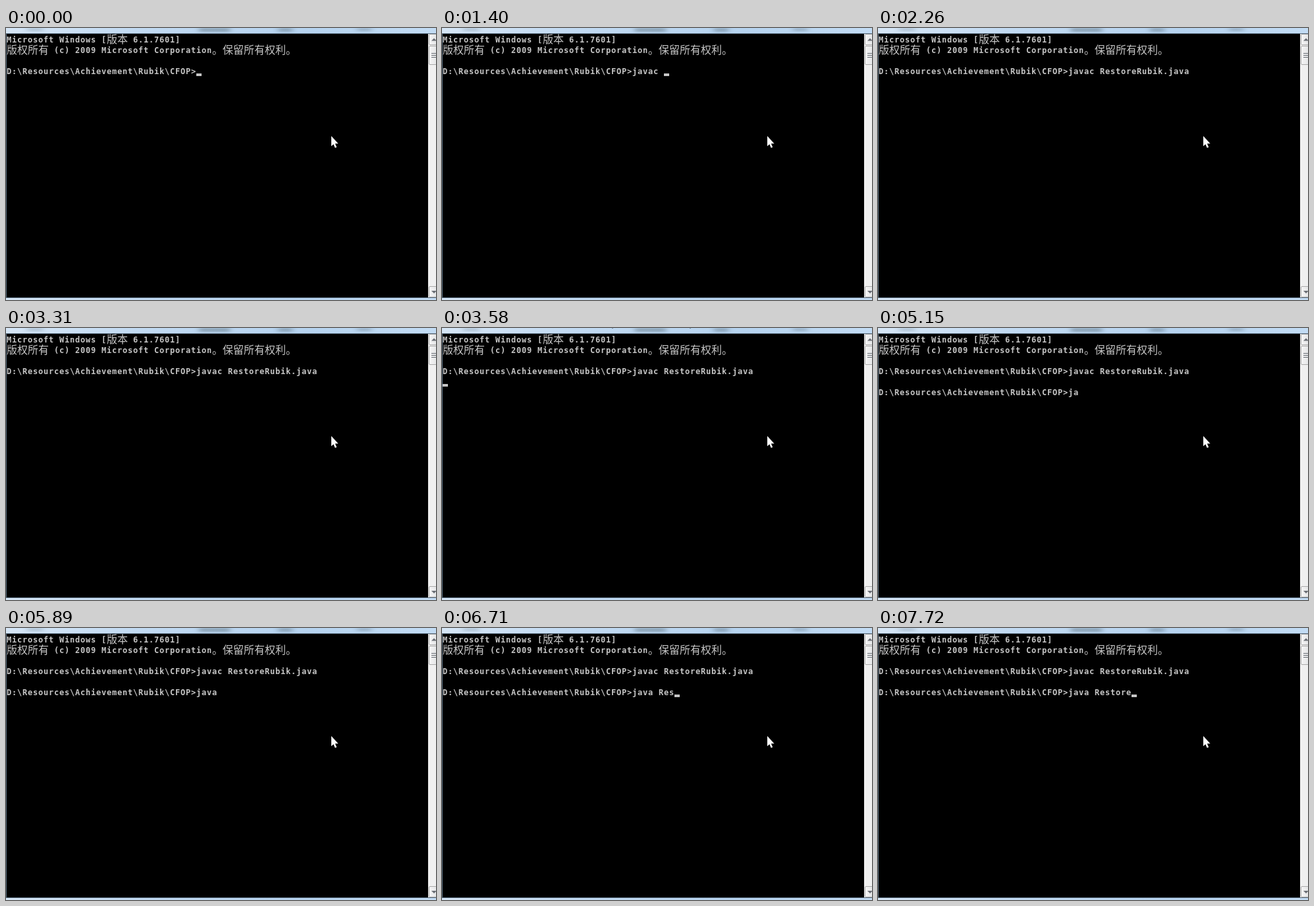
Write an HTML page that moves like this. It is 653 px wide and 413 px high and loops after 8000 ms.

```html
<!DOCTYPE html>
<html lang="zh">
<head>
<meta charset="utf-8">
<title>Console</title>
<style>
  html, body { margin: 0; width: 100%; height: 100%; overflow: hidden; background: #000; }
  svg { display: block; width: 653px; height: 413px; }
  text { white-space: pre; fill: #c6c6c6; }
  .latin { font: bold 12px "DejaVu Sans Mono", "Liberation Mono", monospace; letter-spacing: .776px; }
  .han { font: 300 16px "Noto Sans CJK SC", "Noto Sans CJK", sans-serif; }
</style>
</head>
<body>
<svg id="stage" viewBox="0 0 653 413">
  <defs>
    <linearGradient id="glass">
      <stop offset="0" stop-color="#d6e6f6"/>
      <stop offset=".3" stop-color="#c2daf2"/>
      <stop offset=".7" stop-color="#b6d3ef"/>
      <stop offset="1" stop-color="#c3dcf4"/>
    </linearGradient>
    <linearGradient id="button">
      <stop offset="0" stop-color="#f6f6f6"/>
      <stop offset="1" stop-color="#dfe0e2"/>
    </linearGradient>
    <filter id="soft" x="-50%" y="-200%" width="200%" height="500%">
      <feGaussianBlur stdDeviation="4 1.6"/>
    </filter>
  </defs>

  <rect width="653" height="413" fill="url(#glass)"/>
  <g fill="#6f8799" opacity=".6" filter="url(#soft)">
    <rect x="32" y="0" width="24" height="5" opacity=".5"/>
    <rect x="293" y="0" width="47" height="6"/>
    <rect x="413" y="0" width="22" height="6" opacity=".9"/>
    <rect x="533" y="0" width="22" height="5" opacity=".7"/>
  </g>
  <g id="busy" fill="#4f6272" opacity=".6">
    <rect x="258" y="0" width="2" height="1"/>
    <rect x="376" y="0" width="2" height="1"/>
  </g>
  <rect y="8" width="653" height="402" fill="#56697a"/>
  <rect x="1" y="9" width="640" height="400" fill="#000"/>

  <g id="scrollbar">
    <rect x="641" y="9" width="12" height="400" fill="#f0f0f0"/>
    <g fill="url(#button)" stroke="#a9a9a9">
      <rect x="642.5" y="9.5" width="15" height="16" rx="1.5"/>
      <rect x="642.5" y="27.5" width="15" height="28" rx="1.5"/>
      <rect x="642.5" y="392.5" width="15" height="16" rx="1.5"/>
    </g>
    <path d="M646 19.5h7v-1l-3-3zM646 399h7v1l-3 3z" fill="#6a6e75"/>
    <path d="M646 38.5h7M646 41.5h7M646 44.5h7" stroke="#666b72"/>
  </g>

  <g id="screen"></g>
  <rect id="caret" width="8" height="4" fill="#c6c6c6"/>
  <path d="M494 164V179.5L497.3 176.5L499.7 182L502.2 181L499.8 175.5H504.5Z" fill="#fff"/>
</svg>
<script>
const LOOP = 8000, CELL = 8, LINE = 16;
const PROMPT = "D:\\Resources\\Achievement\\Rubik\\CFOP>";
const FIRST = "javac RestoreRubik.java";
const screen = document.getElementById("screen");
const caret = document.getElementById("caret");
const busy = document.getElementById("busy");

function put(col, row, string, han) {
  const el = document.createElementNS("http://www.w3.org/2000/svg", "text");
  el.setAttribute("class", han ? "han" : "latin");
  el.setAttribute("x", 1 + col * CELL);
  el.setAttribute("y", row * LINE + (han ? 23 : 22));
  el.textContent = string;
  screen.append(el);
  return el;
}

put(0, 0, "Microsoft Windows [");
put(19, 0, "版本", true);
put(23, 0, " 6.1.7601]");
put(0, 1, "版权所有", true);
put(8, 1, " (c) 2009 Microsoft Corporation");
put(39, 1, "。保留所有权利。", true);
put(0, 3, PROMPT);
const input = put(PROMPT.length, 3, "");
const nextPrompt = put(0, 5, PROMPT);
const nextInput = put(PROMPT.length, 5, "");

// [start ms, typed text, caret visible]
const compile = [
  [0, "", 1], [430, "", 0], [580, "j", 0], [700, "ja", 0],
  [850, "java", 1], [1000, "javac", 0], [1400, "javac ", 1],
  [1830, "javac r", 0], [1980, "javac res", 0],
  [2260, FIRST, 0], [3000, FIRST, 1], [3310, FIRST, 0]
];
const run = [
  [4040, "", 0], [5000, "j", 0], [5150, "ja", 0], [5270, "java", 0],
  [5580, "java", 1], [5890, "java", 0], [6140, "java ", 1],
  [6290, "java R", 0], [6410, "java Re", 0], [6560, "java Res", 0],
  [6710, "java Res", 1], [7150, "java Res", 0], [7300, "java Resto", 0],
  [7450, "java Restor", 0], [7570, "java Restore", 0], [7720, "java Restore", 1]
];

const latest = (steps, t) => steps.filter(s => s[0] <= t).pop() || [0, "", 0];
const show = (el, on) => el.setAttribute("visibility", on ? "visible" : "hidden");

function placeCaret(col, row, on) {
  caret.setAttribute("x", 1 + col * CELL);
  caret.setAttribute("y", 21 + row * LINE);
  show(caret, on);
}

function draw(t) {
  const ready = t >= 4040;
  const [, first, firstCaret] = latest(compile, t);
  const [, second, secondCaret] = latest(run, t);
  input.textContent = first;
  nextInput.textContent = second;
  show(nextPrompt, ready);
  show(busy, t >= 3430 && !ready);
  if (ready) placeCaret(PROMPT.length + second.length, 5, secondCaret);
  else if (t >= 3580) placeCaret(0, 4, true);
  else placeCaret(PROMPT.length + first.length, 3, firstCaret);
}

const start = performance.now();
function tick() {
  draw((performance.now() - start) % LOOP);
  requestAnimationFrame(tick);
}
tick();
</script>
</body>
</html>
```
